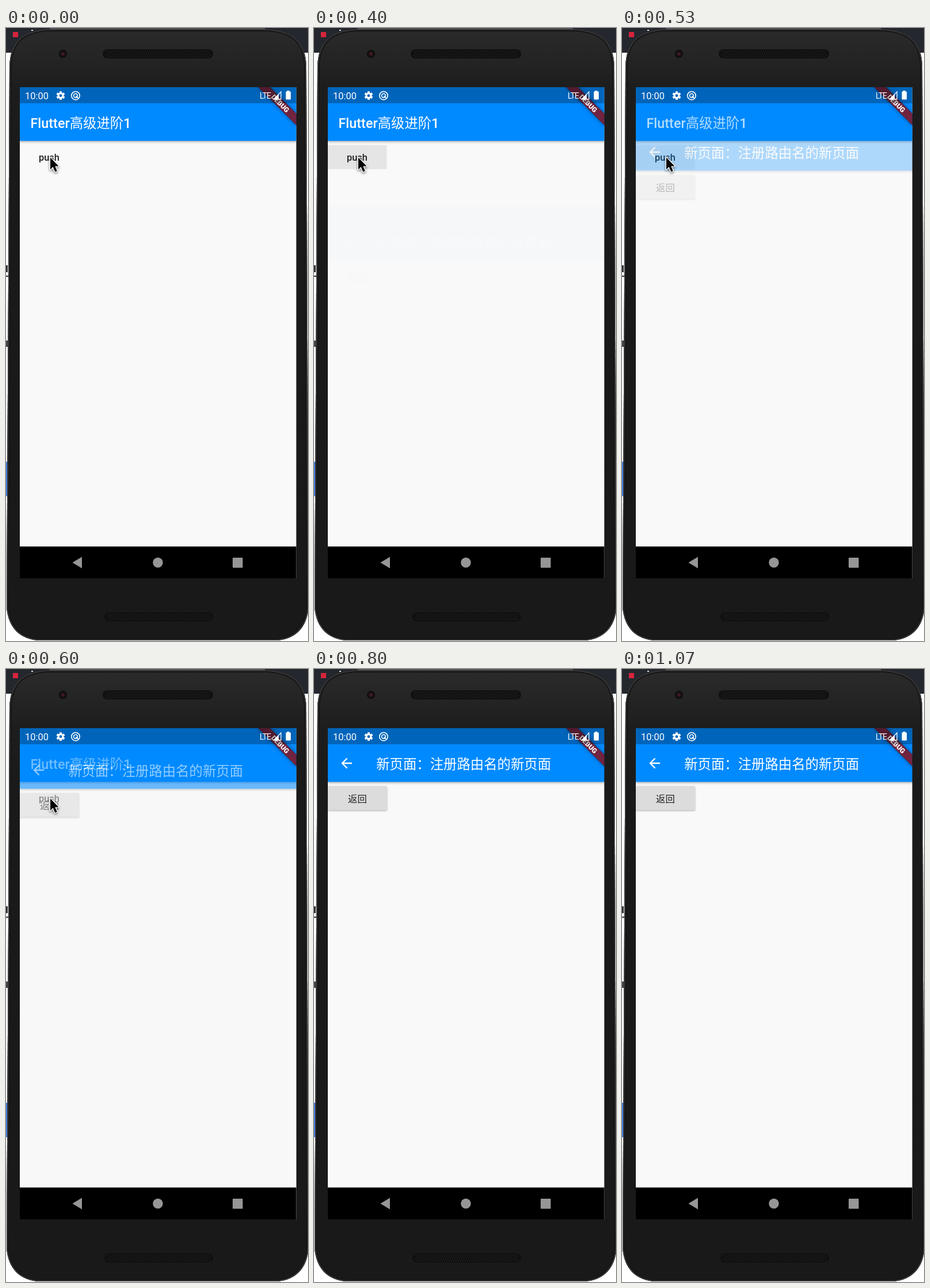
These frames come from a looping animation (525 by 1067 pixels, 1140 ms). An HTML page with a canvas:

```html
<!DOCTYPE html>
<html lang="zh-CN">
<head>
<meta charset="utf-8">
<title>Route transition</title>
<style>
html, body { margin: 0; width: 100%; height: 100%; overflow: hidden; background: #fff; }
canvas { display: block; }
</style>
</head>
<body>
<canvas id="stage" width="525" height="1067"></canvas>
<script>
const W = 525, H = 1067, LOOP = 1140, STEP = 200 / 3, LAST = 16;
const SCREEN = { x: 24, y: 103, w: 481, h: 855 };
const BAR = 93.5, TITLE = 23.38, BODY = 16.4;
const BLUE = '#008aff', PAPER = '#f9f9f9';
const LATIN = 'Roboto, sans-serif';
const HAN = '"Noto Sans CJK SC", "Noto Sans CJK", sans-serif';
const ctx = document.getElementById('stage').getContext('2d');

// Route progress per tick, starting at tick 6
const ROUTE = [0.1, 0.308, 0.487, 0.713, 0.93];
// Pressed highlight per tick, starting at tick 4
const PRESS = [0.1, 0.4, 0.75, 1, 0.4];
// Pointer tip once it leaves, starting at tick 10
const LEAVE = [[88, 165], [112, 35]];

function bezier(x1, y1, x2, y2) {
  const at = (a, b, s) => 3 * (1 - s) * (1 - s) * s * a + 3 * (1 - s) * s * s * b + s * s * s;
  return x => {
    let lo = 0, hi = 1;
    for (let i = 0; i < 30; i++) {
      const mid = (lo + hi) / 2;
      if (at(x1, x2, mid) < x) lo = mid; else hi = mid;
    }
    return at(y1, y2, lo);
  };
}
const easeIn = bezier(0.42, 0, 1, 1);
const fastOutSlowIn = bezier(0.4, 0, 0.2, 1);

function layer(paint) {
  const c = document.createElement('canvas');
  c.width = W;
  c.height = H;
  paint(c.getContext('2d'));
  return c;
}

function box(g, x, y, w, h, fill) {
  g.fillStyle = fill;
  g.fillRect(x, y, w, h);
}

function round(g, x, y, w, h, r, fill) {
  g.fillStyle = fill;
  g.beginPath();
  g.roundRect(x, y, w, h, r);
  g.fill();
}

function disc(g, x, y, r, fill) {
  g.fillStyle = fill;
  g.beginPath();
  g.arc(x, y, r, 0, 7);
  g.fill();
}

function poly(g, points, fill) {
  g.beginPath();
  points.forEach(([x, y]) => g.lineTo(x, y));
  g.closePath();
  g.fillStyle = fill;
  g.fill();
}

// Draws a run and returns where the next one starts
function label(g, str, x, y, size, fill, weight = 400, family = LATIN) {
  g.font = `${weight} ${size}px ${family}`;
  g.fillStyle = fill;
  g.fillText(str, x, y);
  return x + g.measureText(str).width;
}

function shadowed(g, alpha, blur, dy, paint) {
  g.save();
  g.shadowColor = `rgba(0,0,0,${alpha})`;
  g.shadowBlur = blur;
  g.shadowOffsetY = dy;
  paint();
  g.restore();
}

function scaffold(g) {
  box(g, SCREEN.x, SCREEN.y, SCREEN.w, SCREEN.h, PAPER);
  shadowed(g, 0.34, 4, 1.5, () => box(g, SCREEN.x, SCREEN.y, SCREEN.w, BAR, BLUE));
}

const nextPage = layer(g => {
  scaffold(g);
  g.save();
  g.translate(42.7, 150);
  g.scale(1.17, 1.17);
  g.fillStyle = '#fff';
  g.fill(new Path2D('M20 11H7.83l5.59-5.59L12 4l-8 8 8 8 1.41-1.41L7.83 13H20z'));
  g.restore();
  label(g, '新页面：注册路由名的新页面', 108.2, 174, TITLE, '#fff', 400, HAN);
  shadowed(g, 0.28, 3, 1.2, () => round(g, 24, 203.7, 103, 42, 2, '#dcdcdc'));
  label(g, '返回', 59, 232, BODY, '#222', 400, HAN);
});

function homePage(g, press) {
  scaffold(g);
  const x = label(g, 'Flutter', 42.5, 174, TITLE, '#fff', 500);
  const end = label(g, '高级进阶', x, 174, TITLE, '#fff', 400, HAN);
  label(g, '1', end, 174, TITLE, '#fff', 500);
  if (press) round(g, 24, 203.7, 102.5, 42, 2, `rgba(186,186,186,${0.42 * press})`);
  label(g, 'push', 57, 230.8, BODY, '#1f1f1f', 500);
}

function debugBanner(g) {
  g.save();
  g.translate(505, 103);
  g.rotate(Math.PI / 4);
  shadowed(g, 0.5, 7, 0, () => box(g, -47, 32.8, 94, 14, '#000'));
  // The tint sits on a half-darkened bar
  box(g, -47, 32.8, 94, 14, '#72233f');
  g.textAlign = 'center';
  label(g, 'DEBUG', 0, 44.2, 12, '#fff', 900);
  g.restore();
}

function statusBar(g) {
  box(g, 24, 103, 481, 28, 'rgba(0,0,0,.27)');
  label(g, '10:00', 33, 124, 16.5, '#fff');

  g.save();
  g.translate(95, 117.7);
  g.fillStyle = '#fff';
  for (let i = 0; i < 6; i++) {
    g.rotate(Math.PI / 3);
    g.fillRect(-2, -7.4, 4, 4);
  }
  disc(g, 0, 0, 5.4, '#fff');
  disc(g, 0, 0, 2.4, '#0065b9');
  g.restore();

  g.strokeStyle = '#fff';
  g.lineWidth = 1.6;
  for (const r of [7.2, 3.4]) {
    g.beginPath();
    g.arc(121, 117.7, r, 0, 7);
    g.stroke();
  }
  g.beginPath();
  g.moveTo(121.5, 118.2);
  g.lineTo(126, 122.7);
  g.stroke();

  g.save();
  g.letterSpacing = '-1px';
  label(g, 'LTE', 441, 122.5, 14, '#fff');
  g.restore();

  g.lineWidth = 1.3;
  g.beginPath();
  g.moveTo(478, 111);
  g.lineTo(478, 124);
  g.lineTo(465.5, 124);
  g.closePath();
  g.stroke();
  poly(g, [[474, 115], [474, 124], [466, 124]], '#fff');

  box(g, 488.5, 109, 4, 2, '#fff');
  round(g, 486.5, 110.5, 8.5, 14, 1, '#fff');
}

function speaker(g, x, y, w, h) {
  round(g, x, y, w, h, h / 2, '#101010');
  g.fillStyle = '#252525';
  for (let row = 0; row < 4; row++)
    for (let px = x + 5 + (row % 2) * 2; px < x + w - 5; px += 4)
      g.fillRect(px, y + 2.5 + row * 3.2, 1.6, 1.6);
}

const device = layer(g => {
  box(g, 0, 0, W, H, '#fff');
  box(g, 0, 0, W, 43, '#25272f');
  box(g, 76, 0, 374, 2, '#55565b');
  box(g, 12, 7, 9, 9, '#d8243c');
  box(g, 44, 3, 3, 2, '#ddd');
  box(g, 0, 413, 3, 12, '#333');
  box(g, 0, 431, 4, 2, '#333');
  box(g, 0, 544, 3, 11, '#444');
  box(g, 0, 755, 4, 60, '#4a80e4');

  const body = new Path2D(
    'M72 2H454C502 5 520 25 522 66L526 1008C523 1045 502 1064 470 1066' +
    'H57C25 1064 4 1045 1 1008L6 66C8 25 26 5 72 2Z');
  const shade = g.createLinearGradient(0, 0, 0, H);
  shade.addColorStop(0, '#2b2b2b');
  shade.addColorStop(0.1, '#1d1d1d');
  shade.addColorStop(0.2, '#1a1a1a');
  shade.addColorStop(1, '#191919');
  g.fillStyle = shade;
  g.fill(body);
  g.save();
  g.clip(body);
  g.strokeStyle = '#141414';
  g.lineWidth = 8;
  g.stroke(body);
  g.strokeStyle = '#363636';
  g.lineWidth = 4;
  g.stroke(body);
  g.restore();

  speaker(g, 168, 37, 192, 16);
  speaker(g, 171, 1017, 189, 16);
  disc(g, 99, 45, 7, '#0d0d0d');
  disc(g, 99, 45, 4.5, '#241417');
  disc(g, 99, 45, 2, '#4d1c25');
});

function navBar(g) {
  box(g, 24, 902.5, 481, 55.5, '#000');
  poly(g, [[115.5, 930.5], [132, 920.5], [132, 940.5]], '#969696');
  disc(g, 264, 930.5, 8.7, '#969696');
  round(g, 394, 922, 17.5, 17.5, 1, '#969696');
}

function pointer(g, x, y) {
  const shape = [[0, 0], [0, 23.5], [5.3, 18.6], [9.4, 28], [13.4, 26.3], [9.4, 17], [16.5, 17]];
  g.save();
  g.translate(x, y);
  g.scale(0.88, 0.88);
  g.lineJoin = 'round';
  g.lineWidth = 3;
  g.strokeStyle = '#fff';
  shadowed(g, 0.4, 4, 2, () => {
    poly(g, shape, '#fff');
    g.stroke();
  });
  poly(g, shape, '#000');
  g.restore();
}

function draw(time) {
  const tick = Math.min(LAST, Math.floor((time + 3.4) / STEP));
  const route = tick < 6 ? 0 : ROUTE[tick - 6] ?? 1;

  ctx.drawImage(device, 0, 0);
  ctx.save();
  ctx.beginPath();
  ctx.rect(SCREEN.x, SCREEN.y, SCREEN.w - 0.4, SCREEN.h);
  ctx.clip();
  if (route < 1) homePage(ctx, PRESS[tick - 4] ?? 0);
  if (route > 0) {
    ctx.globalAlpha = route < 1 ? easeIn(route) : 1;
    const rise = route < 1 ? SCREEN.h / 4 * (1 - fastOutSlowIn(route)) : 0;
    ctx.drawImage(nextPage, 0, Math.round(rise));
    ctx.globalAlpha = 1;
  }
  debugBanner(ctx);
  statusBar(ctx);
  navBar(ctx);
  ctx.restore();

  const tip = tick < 10 ? [77, 225.5] : LEAVE[tick - 10];
  if (tip) pointer(ctx, ...tip);
}

const start = performance.now();
function loop() {
  draw((performance.now() - start) % LOOP);
  requestAnimationFrame(loop);
}
loop();
</script>
</body>
</html>
```
